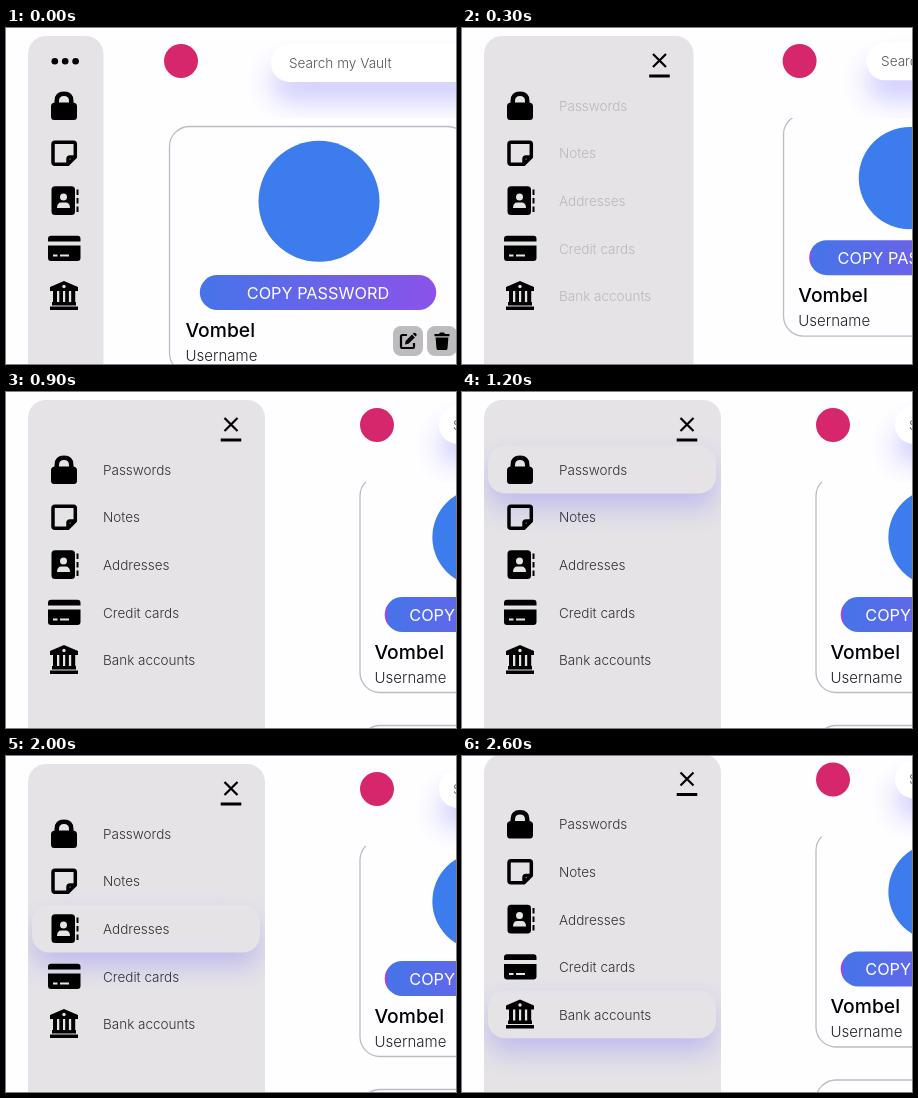
These frames come from a looping animation (450x336 px, 2.7 s). An HTML page:

```html
<!DOCTYPE html>
<html lang="en">
<head>
<meta charset="utf-8">
<title>Vault sidebar</title>
<style>
html, body { margin: 0; width: 100%; height: 100%; overflow: hidden; background: #fefdff; }
svg { display: block; width: 100vw; height: 100vh; }
text { font-family: Inter, "Open Sans", sans-serif; font-weight: 300; }
</style>
</head>
<body>
<svg viewBox="0 0 450 336">
  <defs>
    <filter id="blur" x="-30%" y="-120%" width="160%" height="340%"><feGaussianBlur stdDeviation="13"/></filter>
    <linearGradient id="pill">
      <stop offset="0" stop-color="#8b50e8"/>
      <stop id="rimA" stop-color="#8b50e8"/>
      <stop id="rimB" stop-color="#4674e8"/>
      <stop offset="1" stop-color="#8b52ea"/>
    </linearGradient>
    <clipPath id="below"><rect y="90" width="450" height="300"/></clipPath>
    <clipPath id="above"><rect y="-20" width="450" height="110"/></clipPath>
    <clipPath id="inside"><rect id="sideClip" x="22" y="8" height="400" rx="18"/></clipPath>
  </defs>
  <rect width="450" height="336" fill="#fefdff"/>
  <g id="page">
    <g clip-path="url(#below)">
      <rect id="card" rx="20" fill="#fefdff" stroke="#bcbbc3" stroke-width="1.3"/>
      <rect id="next" rx="20" height="250" fill="#fefdff" stroke="#bcbbc3" stroke-width="1.3"/>
      <circle id="brand" fill="#3c7cec"/>
      <rect id="copy" height="35" rx="17.5" fill="url(#pill)"/>
      <text id="copyText" font-size="16.3" text-anchor="middle" fill="#fff" style="font-weight:400">COPY PASSWORD</text>
      <text id="name" font-size="19.3" fill="#000" style="font-weight:450">Vombel</text>
      <text id="user" font-size="15" fill="#222">Username</text>
      <g id="tools">
        <rect width="30" height="30" rx="8" fill="#bdbbbd"/>
        <rect x="34" width="30" height="30" rx="8" fill="#bdbbbd"/>
        <path d="M14 9H9.500Q8 9 8 10.500V20.500Q8 22 9.500 22H19.500Q21 22 21 20.500V17" fill="none" stroke="#000" stroke-width="2.200"/>
        <path d="M12 18.500L12.600 15L19 8.600L21.800 11.400L15.500 17.800ZM19.800 7.800L21 6.800Q22 6.500 23.300 7.800Q24 8.800 23.500 9.500L22.500 10.600Z"/>
        <path d="M41.500 8H46L47 6.500H51L52 8H56.500V10.200H41.500ZM42.600 11.500H55.400L54.500 22.500Q54.300 24 53 24H45Q43.700 24 43.500 22.500Z"/>
      </g>
    </g>
    <g clip-path="url(#above)">
      <circle id="logo" cy="33" r="17" fill="#d6266c"/>
      <g id="search">
        <rect y="20" width="420" height="38" rx="19" fill="#6666ff" opacity=".3" filter="url(#blur)"/>
        <rect width="420" height="38" rx="19" fill="#fff"/>
        <text id="query" y="23.700" font-size="13.6" fill="#555">Search my Vault</text>
      </g>
    </g>
    <rect id="side" x="22" y="8" height="400" rx="18" fill="#e5e3e6"/>
    <g id="hovers" clip-path="url(#inside)"></g>
    <g id="dots"><circle cx="48.800" cy="33.300" r="3.300"/><circle cx="59.200" cy="33.300" r="3.300"/><circle cx="69.600" cy="33.300" r="3.300"/></g>
    <g id="close" stroke="#000" fill="none">
      <path d="M-6.500 26L6.500 39M6.500 26L-6.500 39" stroke-width="2.200"/>
      <path d="M-10.300 48H10.300" stroke-width="3"/>
    </g>
    <g id="icons">
      <path d="M48.500 74.500V73Q48.500 63.500 58 63.500Q67.500 63.500 67.500 73V74.500Q71 75 71 78V88.500Q71 92 68 92H48Q45 92 45 88.500V78Q45 75 48.500 74.500ZM53 74.500H63V73Q63 68 58 68Q53 68 53 73Z" fill-rule="evenodd"/>
      <path d="M49 114.300H67.500Q69.300 114.300 69.300 116.300V129L62 136.300H49Q47 136.300 47 134.300V116.300Q47 114.300 49 114.300ZM69 129H64Q62 129 62 131V136" fill="none" stroke="#000" stroke-width="3.500" stroke-linejoin="round"/>
      <rect x="45.500" y="158.300" width="23.500" height="28.700" rx="3.500"/>
      <path d="M71.500 161.500V167M71.500 170V175.500M71.500 178.500V184" stroke="#000" stroke-width="2"/>
      <g fill="#e5e3e6">
        <circle cx="57.500" cy="169" r="3.500"/>
        <path d="M51 180Q51 174.500 55.500 174.500H59.500Q64 174.500 64 180Z"/>
      </g>
      <path d="M45 207.800H71.500Q74.500 207.800 74.500 211V213.500H42V211Q42 207.800 45 207.800ZM42 217.600H74.500V230Q74.500 233 71.500 233H45Q42 233 42 230Z"/>
      <path d="M47 227.500H51.500M54 227.500H63" stroke="#e5e3e6" stroke-width="2"/>
      <path d="M58 253L72 259V263H44V259ZM47 263H51V274H47ZM53.300 263H57V274H53.300ZM59.200 263H62.900V274H59.200ZM65.200 263H69.200V274H65.200ZM46 274H70V277.500H46ZM44 278.500H72V282H44Z"/>
      <circle cx="58" cy="258.500" r="1.700" fill="#e5e3e6"/>
    </g>
    <g id="labels" font-size="13.5" fill="#111"></g>
  </g>
</svg>
<script>
const LOOP = 2700, STEP = 100;
const $ = id => document.getElementById(id);
const set = (id, attrs) => {
  for (const k in attrs) $(id).setAttribute(k, attrs[k]);
};
const clamp = v => Math.max(0, Math.min(1, v));
const mix = (a, b, p) => a + (b - a) * p;
const move = (x, y) => `translate(${x} ${y})`;

const items = [
  { label: 'Passwords', from: 1000, to: 1250 },
  { label: 'Notes', from: 1250, to: 1750 },
  { label: 'Addresses', from: 1750, to: 2150 },
  { label: 'Credit cards', from: 2150, to: 2350 },
  { label: 'Bank accounts', from: 2350, to: 9999 }
];
const rowY = i => 77.7 + 47.6 * i;

$('hovers').innerHTML = items.map((_, i) => {
  const y = rowY(i) - 23.8;
  return `<g id="hover${i}">
    <rect x="26" y="${y + 14}" width="228" height="47.500" rx="17" fill="#6a62ff" opacity=".3" filter="url(#blur)"/>
    <rect x="26" y="${y}" width="228" height="47.500" rx="17" fill="#e5e3e6"/></g>`;
}).join('');

$('labels').innerHTML = items.map((it, i) =>
  `<text id="label${i}" x="97" y="${rowY(i) + 5.1}">${it.label}</text>`).join('') +
  `<g id="wrapped" text-anchor="middle"><text x="141.500" y="263.300">Bank</text><text x="141.500" y="282.300">accounts</text></g>`;

// cubic-bezier(.25, .1, .25, 1)
function ease(x) {
  if (x <= 0 || x >= 1) return clamp(x);
  const curve = (a, b, s) => 3 * a * s * (1 - s) ** 2 + 3 * b * s * s * (1 - s) + s ** 3;
  let lo = 0, hi = 1;
  for (let i = 0; i < 30; i++) {
    const mid = (lo + hi) / 2;
    if (curve(.25, .25, mid) < x) lo = mid; else hi = mid;
  }
  return curve(.1, 1, lo);
}

function draw(t) {
  const p = ease((t - 25) / 520);
  const open = p > 0;
  set('page', { transform: move(0, -9.5 * clamp((t - 2400) / 200)) });

  // sidebar
  const width = mix(75.5, 237, p);
  set('side', { width });
  set('sideClip', { width });
  set('dots', { opacity: open ? 0 : 1 });
  set('close', { opacity: open ? 1 : 0, transform: move(22 + width - 34, 0) });
  set('labels', { opacity: .85 * clamp((t - 120) / 750) });
  set('label4', { opacity: p < .75 ? 0 : 1 });
  set('wrapped', { opacity: p < .75 ? 1 : 0 });
  items.forEach((it, i) => set('hover' + i, {
    opacity: clamp((t - it.from) / 150) * clamp(1 - (t - it.to) / 150)
  }));

  // header
  set('logo', { cx: mix(175, 371, p) });
  set('search', { transform: move(mix(265, 433, p), mix(16, 14, p)) });
  set('query', { x: mix(18, 14, p) });

  // cards
  const x = mix(163.5, 354, p), w = mix(298, 242, p);
  const top = mix(98.5, 84, p), btn = mix(247, 205, p);
  const bottom = btn + mix(98, 95.5, p), textX = x + mix(16, 14.5, p);
  set('card', { x, y: top, width: w, height: bottom - top });
  set('next', { x, y: bottom + 33, width: w });
  set('brand', { cx: x + w / 2 + .5, cy: mix(173.3, 145.3, p), r: w * .203 });
  set('copy', { x: x + w * .1 + .5, y: btn, width: w * .8 - 2 });
  set('copyText', { x: x + w / 2 - .5, y: btn + 23.7 });
  set('rimA', { offset: .018 * p });
  set('rimB', { offset: .018 * p });
  set('name', { x: textX, y: btn + 61.5 });
  set('user', { x: textX, y: btn + 85.8 });
  set('tools', { transform: move(x + w - 74.5, btn + 51) });
}

const start = performance.now();
function tick() {
  const t = (performance.now() - start) % LOOP;
  draw(Math.floor(t / STEP) * STEP);
  requestAnimationFrame(tick);
}
draw(0);
requestAnimationFrame(tick);
</script>
</body>
</html>
```
